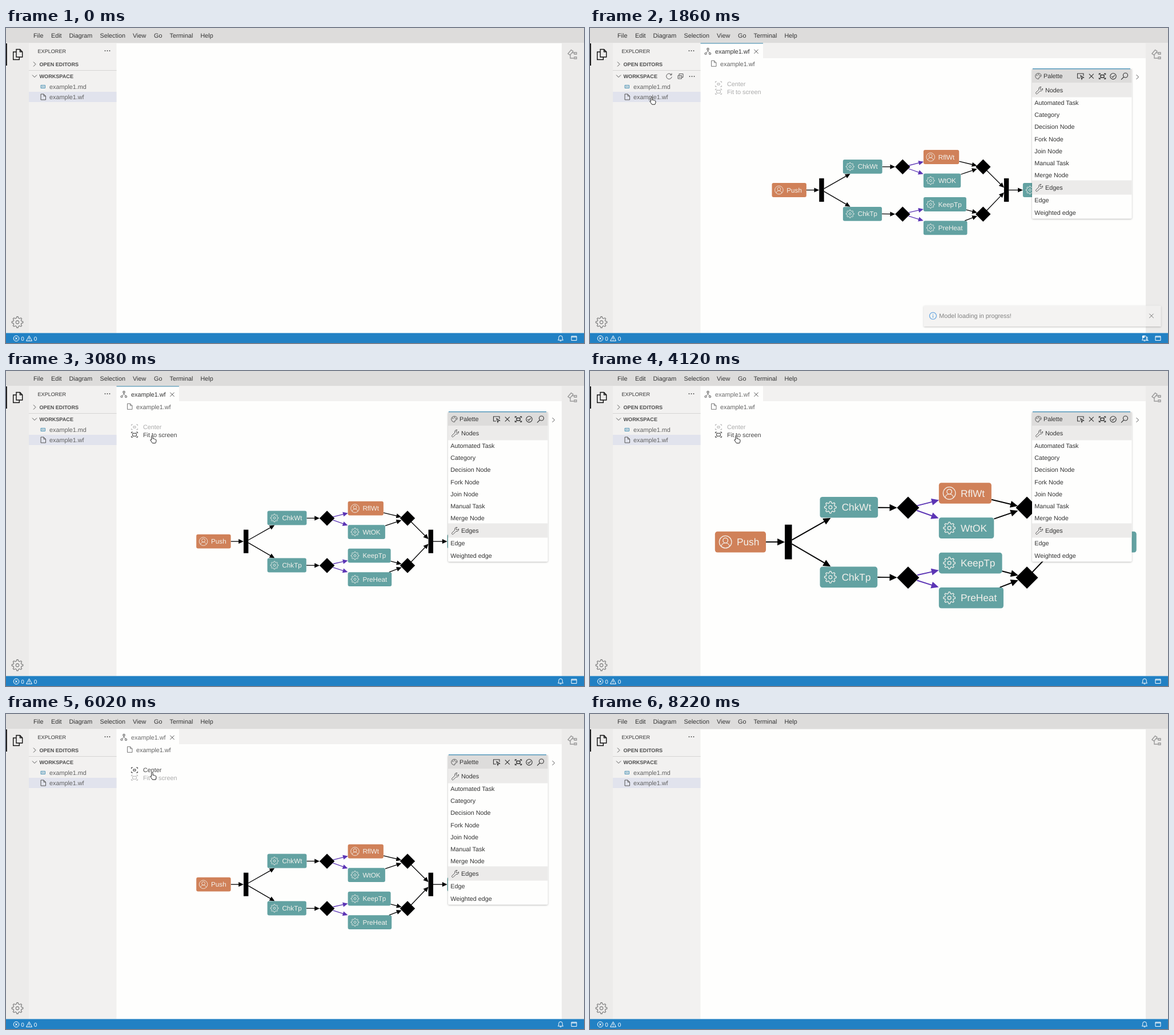
These frames come from a looping animation (1012x553 px, 8.92 s). An HTML page:

```html
<!DOCTYPE html>
<html lang="en">
<head>
<meta charset="utf-8">
<title>Workflow diagram editor</title>
<style>
html, body { margin: 0; width: 100%; height: 100%; overflow: hidden; background: #fefefd; }
svg { display: block; width: 1012px; height: 553px; }
text { font: 10.8px "Liberation Sans", Arial, sans-serif; fill: #333; text-rendering: geometricPrecision; white-space: pre; }
.small { font-size: 9.1px; }
.bold { font-weight: bold; fill: #4c4c4c; }
.soft { fill: #616161; }
.node { font-size: 11.7px; fill: #f3f1ec; }
.status { font-size: 10px; fill: #fff; }
.line { fill: none; stroke: #555; stroke-width: 1; }
.white { stroke: #fff; }
.tool .line { stroke: #b2b2b2; }
.tool text { fill: #aaa; }
.tool.on .line { stroke: #333; }
.tool.on text { fill: #444; }
.idle text { fill: #6c6c6c; }
.idle .accent { display: none; }
.focus rect { fill: #0074e8; }
.focus text { fill: #fff; }
.focus .line { stroke: #fff; }
</style>
</head>
<body>
<svg id="stage" viewBox="0 0 1012 553" xmlns="http://www.w3.org/2000/svg"></svg>
<script>
const text = (x, y, s, cls = '') => `<text x="${x}" y="${y}" class="${cls}">${s}</text>`;
const rect = (x, y, w, h, fill, extra = '') => `<rect x="${x}" y="${y}" width="${w}" height="${h}" fill="${fill}" ${extra}/>`;
const line = (d, extra = '') => `<path class="line" d="${d}" ${extra}/>`;
const icon = (d, color, w = 1) => line(d, `style="stroke:${color};stroke-width:${w}"`);
const group = (id, body, extra = '') => `<g id="${id}" ${extra}>${body}</g>`;
const ring = (x, y, r) => `M${x - r} ${y}a${r} ${r} 0 1 0 ${2 * r} 0a${r} ${r} 0 1 0 ${-2 * r} 0`;
const cross = (x, y, r) => `M${x - r} ${y - r}l${2 * r} ${2 * r}m0 ${-2 * r}l${-2 * r} ${2 * r}`;
const box = (x, y, w, h) => `M${x} ${y}h${w}v${h}h${-w}z`;
const dots = (x, y) => [-4, 0, 4].map(d => `<circle cx="${x + d}" cy="${y}" r=".9" fill="#444"/>`).join('');
const page = (x, y) => `M${x} ${y}h5l3.5 3.5v6.5h-8.5zm5 0v3.5h3.5`;

function gear(x, y, r) {
  let d = '';
  for (let i = 0; i < 32; i++) {
    const a = (i - 1.5) * Math.PI / 16, k = i % 4 === 1 || i % 4 === 2 ? r : r * .74;
    d += `${i ? 'L' : 'M'}${(x + k * Math.cos(a)).toFixed(2)} ${(y + k * Math.sin(a)).toFixed(2)}`;
  }
  return d + 'z' + ring(x, y, r * .28);
}

// Corner brackets around an inner box
const frame = (x, y, w, h) =>
  `M${x - 5.5} ${y - 2.5}v-2h2.5m6 0h2.5v2m0 5v2h-2.5m-6 0h-2.5v-2` + box(x - w / 2, y - h / 2, w, h);

const wrench = (x, y) =>
  `M${x - 5} ${y + 4}l5-5c-1-3 1-5 4-4.5l-2 2 .5 2 2 .5 2-2c.5 3-1.5 5-4.5 4.5l-5 5c-1.5 1-3.5-1-2-2.5z`;

function shell() {
  const menu = [['File', 48], ['Edit', 79], ['Diagram', 110.5], ['Selection', 164.5],
    ['View', 222], ['Go', 259], ['Terminal', 286.5], ['Help', 340.5]];
  return rect(0, 0, 1012, 553, '#fefefd') +
    rect(0, 0, 1012, 26.5, '#dddcdb') +
    menu.map(([s, x]) => text(x, 17, s)).join('') +
    rect(0, 26.5, 40, 509, '#ecebea') + rect(973, 26.5, 39, 509, '#ecebea') +
    rect(40, 26.5, 153.5, 509, '#f2f1f0') +
    group('bar', rect(0, 27, 1.7, 39, '#000')) +
    icon('M18 37.5h6.5l4.2 4.2v9.3h-10.7zm6.5 0v4.2h4.2M18 42h-5.3v13.5h10.6v-4.5', '#111', 1.4) +
    icon(gear(20, 516.5, 9.8), '#858585', 1.3) +
    icon('M984 45l5.5-6.5 3.5 2.5-5.5 6.5zM990.5 43.5h4M988 47v6h6' + box(995, 43, 4, 3) + box(995, 51, 4, 3), '#999', 1.4) +
    text(55.5, 43.5, 'EXPLORER', 'small') + dots(177.5, 40) +
    line('M48 59.5l4 4-4 4M46 82.5l4 4 4-4') +
    text(58.5, 67, 'OPEN EDITORS', 'small bold') + text(58.5, 88, 'WORKSPACE', 'small bold') +
    rect(40, 74, 153.5, 1, '#d5d4d3') +
    icon(box(61, 100.5, 7.5, 5), '#4c93b5') + icon('M62.8 104.5v-2.5l1.2 1.2 1.2-1.2v2.5m1.7-2.5v2', '#4c93b5', .7) +
    text(76, 106.5, 'example1.md', 'soft') +
    group('row', rect(40, 112, 153.5, 18, '#e1e3ed') + line(page(61, 116)) + text(76, 124.8, 'example1.wf', 'soft')) +
    group('actions', line('M142.5 82.2a4.8 4.8 0 1 0 .7 3.5M143 79.5v3h-3' + box(154, 83.5, 6.5, 5.5) +
      'M156 83v-2.5h7v6h-2M155.5 86.2h3.5') + dots(178.5, 85));
}

function statusBar() {
  return rect(0, 535.5, 1012, 17.5, '#2281c4') +
    line(ring(18, 545, 4.8) + cross(18, 545, 2) + 'M40.5 540.3l5 9h-10zM40.5 543.3v3m0 1v1', 'style="stroke:#fff"') +
    text(26.3, 548.8, '0', 'status') + text(48.8, 548.8, '0', 'status') +
    group('bell', line('M966.5 548h9l-1.2-1.8v-2.7a3.3 3.3 0 0 0-6.6 0v2.7zM969.7 549.3h2.6', 'style="stroke:#fff"')) +
    group('badge', '<circle cx="969" cy="542" r="2.3" fill="#fff"/>' + text(973, 548.8, '1', 'status')) +
    line(box(990, 541, 9, 7.5) + 'M990 542.5h9', 'style="stroke:#fff"');
}

function editor() {
  const tool = (id, y, w, h, s) => group(id, line(frame(225, y, w, h)) + text(240, y + 3.9, s), 'class="tool"');
  return rect(193.5, 26.5, 779.5, 26.5, '#f2f1f0') +
    group('tab', rect(193.5, 26.5, 109.5, 26.5, '#fefefd') + rect(193.5, 26.3, 109.5, 1.2, '#4b8fae', 'class="accent"') +
      line(box(205, 35.5, 3, 3) + 'M206.5 38.5v2l-3 3m3-3l3 3' + ring(202.5, 45, 1.6) + ring(210, 45, 1.6)) +
      text(219, 44.7, 'example1.wf') + line(cross(291, 41.3, 3.6))) +
    line(page(212.5, 57.3), 'style="stroke:#777"') + text(228, 66.5, 'example1.wf', 'soft') +
    group('tools', tool('center', 98.5, 4, 3, 'Center') + tool('fit', 111.8, 6.5, 5, 'Fit to screen'));
}

function diagram() {
  const nodes = [['Push', 333.2, 299.2, 60.4, 1], ['ChkWt', 457.6, 258, 68.8], ['ChkTp', 457.6, 341, 68.2],
    ['RflWt', 598.6, 241.2, 62.3, 1], ['WtOK', 598.6, 282.6, 65.3], ['KeepTp', 598.6, 324.2, 75],
    ['PreHeat', 598.6, 365.6, 76.6], ['Brew', 772.6, 299.2, 60.2]];
  const edges = [[393.6, 299.2, 416, 299.2], [424.4, 296.8, 470.4, 270.6], [424.4, 301.6, 470.4, 328.4],
    [526.4, 258.3, 549, 258.4], [525.8, 341.1, 549, 341.4], [661, 248.8, 692.2, 256.4], [664, 271.7, 692.4, 262],
    [673.4, 333.8, 692.7, 338.9], [670.8, 353.1, 692.7, 344.7], [709, 264.5, 739.6, 295],
    [709, 335.5, 739.6, 303.4], [748, 299.2, 772.6, 299.2],
    [572.4, 256.2, 598.8, 249.4, 1], [572.4, 261.7, 598.4, 271, 1], [573, 338.5, 598.6, 332.8, 1], [572.6, 344.8, 598.4, 353, 1]];
  const edge = ([x, y, X, Y, weighted]) => {
    const a = Math.atan2(Y - y, X - x), c = weighted ? '#5c35b5' : '#000';
    return `<path d="M${x} ${y}L${X - 4 * Math.cos(a)} ${Y - 4 * Math.sin(a)}" stroke="${c}" stroke-width="1.3"/>` +
      `<path d="M0 0l-8.8-4.1v8.2z" fill="${c}" transform="translate(${X} ${Y}) rotate(${a * 180 / Math.PI})"/>`;
  };
  const person = (x, y) => ring(x, y, 7.3) + ring(x, y - 1.8, 2.9) + `M${x - 4.9} ${y + 5.3}c.5-5.5 9.3-5.5 9.8 0`;
  const node = ([s, x, y, w, manual]) =>
    rect(x, y - 12.4, w, 24.8, manual ? '#d08159' : '#63a2a2', 'rx="3"') +
    icon(manual ? person(x + 12.4, y) : gear(x + 12.4, y, 7), '#f3f1ec', .85) + text(x + 25.8, y + 4.2, s, 'node');
  const diamond = (x, y) => `<path d="M${x - 13.2} ${y}l13.2-13.2 13.2 13.2-13.2 13.2z"/>`;
  return edges.map(edge).join('') + nodes.map(node).join('') +
    rect(416, 278.6, 8.4, 41.2, '#000') + rect(739.6, 278.6, 8.4, 41.2, '#000') +
    [562.1, 703].map(x => diamond(x, 258.5) + diamond(x, 341.5)).join('');
}

function palette() {
  const items = ['Automated Task', 'Category', 'Decision Node', 'Fork Node', 'Join Node', 'Manual Task', 'Merge Node'];
  const head = (y, s) => rect(774, y, 174.5, 25, '#ecebea') + line(wrench(786, y + 12.5)) + text(797, y + 16.5, s);
  return rect(774, 71.5, 174.5, 263, '#fefefd', 'rx="2" filter="url(#shadow)"') +
    rect(774, 72, 174.5, 24.5, '#dddcdb') + rect(775, 71, 171, 1.3, '#3f8fb8') +
    line('M785 79.5c-7 0-7 10 0 10 2 0 0-3 2-3.5 5 0 4-6.5-2-6.5z' + ring(782.5, 83, .6) + ring(785.5, 81.8, .6) + ring(788, 83.5, .6)) +
    text(794, 88.3, 'Palette') +
    icon('M858 88h-4.5v-8h10.5v4M859 83.5l5.5 3.5-2.5.5-1 2.5z' + cross(877.8, 84.7, 4) + ring(916, 84.7, 5.2) +
      'M913.5 85l1.8 1.8 3.4-4' + ring(937.5, 83, 4) + 'M934.6 86l-4.6 4.6', '#333', 1.1) +
    icon(frame(897, 84.7, 6, 4.5), '#333', 1.4) +
    head(96.5, 'Nodes') + items.map((s, i) => text(778.3, 135.3 + 21.08 * i, s)).join('') +
    head(267.5, 'Edges') + text(778.3, 306.3, 'Edge') + text(778.3, 327.6, 'Weighted edge') +
    line('M956.5 82l4 4-4 4');
}

const notice = () => rect(584.5, 487.5, 415, 36.5, '#f2f1f0', 'filter="url(#shadow)"') +
  icon(ring(600.5, 505.3, 6) + 'M600.5 504.3v4.2m0-6.7v1.3', '#2f86d8', 1.1) +
  text(611.2, 509.2, 'Model loading in progress!', 'soft') + line(cross(983, 505.3, 3.6));

const hand = 'M-1.3 1.2q0-1.2 1.2-1.2t1.2 1.2v4.4l.8-.5q1.4-.3 1.6.9 1.3-.6 1.9.7 1.4-.4 1.5 1v2.6l-1.2 2.9h-5.2l-3.6-5.2q-.5-1.5 1.8-.6z';
const arrow = 'M0 0v11.5l2.7-2.5 1.8 4.2 1.9-.8-1.8-4.1h3.7z';

const $ = id => document.getElementById(id);
$('stage').innerHTML =
  '<defs><filter id="shadow" x="-10%" y="-20%" width="120%" height="140%"><feDropShadow dx="0" dy="1" stdDeviation="1.5" flood-opacity=".3"/></filter>' +
  '<clipPath id="canvas"><path d="M193.5 53h779.5v482.5h-779.5z"/></clipPath></defs>' +
  shell() + group('editor', editor()) +
  `<g clip-path="url(#canvas)">${group('diagram', diagram())}</g>` +
  group('palette', palette()) + statusBar() + group('notice', notice()) +
  '<path id="cursor" fill="#fff" stroke="#222" stroke-width="1" stroke-linejoin="round"/>';

const loop = 8920, fitZoom = 1.554;
const path = [[300, 55, 207], [800, 108, 121], [2160, 108, 121], [2500, 172, 151], [2980, 256, 116], [3080, 256, 113.5],
  [5080, 256, 113.5], [5380, 256, 102], [6760, 256, 102], [7160, 294, 39], [8000, 294, 39], [8100, 430, 72], [8200, 535, 26]];

const ease = t => {
  t = Math.min(1, Math.max(0, t));
  return t < .5 ? 2 * t * t : 1 - 2 * (1 - t) ** 2;
};
const show = (id, on) => { $(id).style.display = on ? '' : 'none'; };

function cursorAt(t) {
  if (t < 300 || t >= 8220) return null;
  const i = path.findIndex(p => p[0] > t);
  if (i < 0) return path[path.length - 1].slice(1);
  const [t0, x0, y0] = path[i - 1], [t1, x1, y1] = path[i], u = (t - t0) / (t1 - t0);
  return [x0 + (x1 - x0) * u, y0 + (y1 - y0) * u];
}

function draw(t) {
  const open = t >= 1520 && t < 7560, loaded = t >= 1760 && t < 7560, noted = t >= 1560 && t < 1920;
  const focused = t >= 1320 && t < 1520;
  show('editor', open);
  show('tools', t >= 1600);
  show('diagram', loaded);
  show('palette', loaded);
  show('notice', noted);
  show('badge', noted);
  show('bar', !focused);
  $('notice').style.opacity = Math.min(1, (t - 1540) / 100, (1940 - t) / 100);
  $('row').setAttribute('class', focused ? 'focus' : '');
  $('tab').setAttribute('class', t >= 3840 ? 'idle' : '');

  // Zoom grows exponentially while the scroll offset moves linearly
  const u = ease((t - 3931) / 250) - ease((t - 5775) / 245);
  const slide = 20 * (1 - ease((t - 1770) / 250));
  $('diagram').setAttribute('transform',
    `translate(${193 - slide} ${72 - slide}) scale(${fitZoom ** u}) translate(${-193 - 138.7 * u} ${-72 - 82.2 * u})`);

  const at = cursorAt(t);
  const [x, y] = at || [-99, -99];
  const onTools = open && x > 218 && x < 300 && y > 92 && y < 118;
  const onFile = x > 40 && x < 193 && y > 94 && y < 130;
  const onTab = open && x > 193 && x < 303 && y > 27 && y < 53;
  show('cursor', at);
  show('actions', at && x < 193);
  $('cursor').setAttribute('d', onTools || onFile || onTab ? hand : arrow);
  $('cursor').setAttribute('transform', `translate(${x} ${y})`);
  $('center').setAttribute('class', onTools && y < 105 ? 'tool on' : 'tool');
  $('fit').setAttribute('class', onTools && y >= 105 ? 'tool on' : 'tool');
}

const start = performance.now();
function tick() {
  draw((performance.now() - start) % loop);
  requestAnimationFrame(tick);
}
tick();
</script>
</body>
</html>
```
